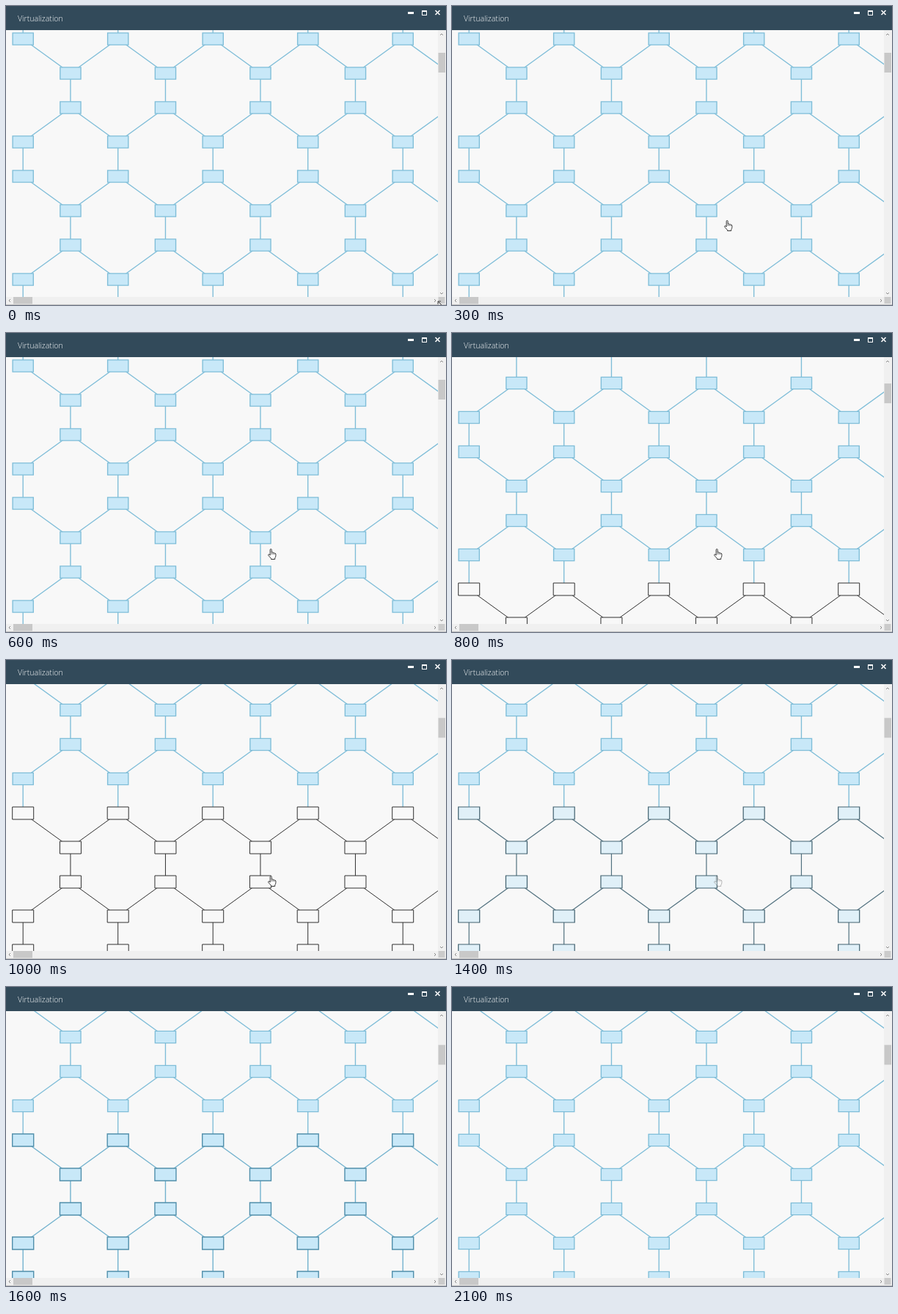
Write an HTML page with a canvas that moves like this. It is 600x409 px and loops after 2200 ms.

```html
<!DOCTYPE html>
<html lang="en">
<head>
<meta charset="utf-8">
<title>Virtualization</title>
<style>
  html, body { margin: 0; width: 100%; height: 100%; overflow: hidden; background: #f8f8f8; }
  canvas { display: block; }
</style>
</head>
<body>
<canvas id="stage" width="600" height="409"></canvas>
<script>
const ctx = document.getElementById('stage').getContext('2d');
const LOOP = 2200, STEP = 100;
const VIEW = { x: 0, y: 33, w: 589, h: 365 };
const COLUMN = 64.75, ROW = 47, SCROLL = 70.5;
const FIRST_NEW_ROW = 8;
const BLUE = [126, 189, 216], PALE = [200, 232, 248], INK = [48, 48, 48], PAPER = [248, 248, 248];
const HAND = new Path2D('M3.2 9V1.5Q3.2.5 4.2.5T5.2 1.5V5Q7 4.6 7.3 5.6Q8.8 5.2 9.2 6.3Q10.9 6 10.9 7.6V9.5Q10.9 11.5 9.7 12.8V14.5H4.5V13.3L1 9.5Q.2 8.4 1 7.8Q1.8 7.4 3.2 9Z');
// Pointer positions at the ends of successive steps, overshooting before it settles.
const APPROACH = [[584, 393], [520, 362], [438, 324], [371, 293], [345, 288], [351, 294], [357, 295]];

const rgb = c => `rgb(${c.map(Math.round).join()})`;
const mix = (a, b, k) => a.map((v, i) => v + (b[i] - v) * k);
const clamp = v => Math.max(0, Math.min(1, v));

function rect(color, x, y, w, h) {
  ctx.fillStyle = color;
  ctx.fillRect(x, y, w, h);
}

function polyline(color, width, ...points) {
  ctx.strokeStyle = color;
  ctx.lineWidth = width;
  ctx.beginPath();
  points.forEach(p => ctx.lineTo(...p));
  ctx.stroke();
}

const isOuter = row => ((row + 4) % 4) % 3 === 0;

// Rows below the first screen start as wireframes and then receive their style.
function rowStyle(row, t) {
  if (row < FIRST_NEW_ROW || t >= 2100) {
    return { link: BLUE, border: BLUE, fill: PALE, width: 1.35, grow: 0 };
  }
  const k = clamp((t - 1200) / 400);
  return {
    link: mix(INK, [114, 178, 206], k),
    border: mix(INK, [80, 143, 171], k),
    fill: mix(PAPER, PALE, k),
    width: 1 + 0.4 * k,
    grow: 0.8
  };
}

function drawGraph(t, scroll) {
  ctx.save();
  ctx.beginPath();
  ctx.rect(VIEW.x, VIEW.y, VIEW.w, VIEW.h);
  ctx.clip();
  const rowY = row => 45 + ROW * row - SCROLL * scroll;
  const colX = col => 23.2 + COLUMN * col;
  const eachNode = draw => {
    for (let row = -1; row < 14; row++) {
      for (let col = isOuter(row) ? 0 : 1; col < 11; col += 2) {
        draw(row, colX(col), rowY(row), rowStyle(row, t), col);
      }
    }
  };
  eachNode((row, x, y, s, col) => {
    const below = rowY(row + 1);
    const color = rgb(s.link);
    const width = s.width;
    if (isOuter(row) === isOuter(row + 1)) {
      polyline(color, width, [x, y], [x, below]);
    } else {
      polyline(color, width, [x, y], [x + COLUMN, below]);
      if (col > 0) polyline(color, width, [x, y], [x - COLUMN, below]);
    }
  });
  eachNode((row, x, y, s) => {
    const w = 28.2 + s.grow, h = 16.2 + s.grow;
    ctx.fillStyle = rgb(s.fill);
    ctx.strokeStyle = rgb(s.border);
    ctx.lineWidth = s.width;
    ctx.beginPath();
    ctx.rect(x - w / 2, y - h / 2, w, h);
    ctx.fill();
    ctx.stroke();
  });
  ctx.restore();
}

function drawWindow(scroll) {
  rect('#324a5a', 0, 0, 600, 33);
  ctx.fillStyle = '#f4f6f7';
  ctx.font = '300 10.6px "Open Sans", "Noto Sans", sans-serif';
  ctx.fillText('Virtualization', 16, 20.5);
  rect('#fff', 548, 8, 8, 3);
  ctx.strokeStyle = '#fff';
  ctx.lineWidth = 1;
  ctx.strokeRect(567.5, 6.5, 6, 6);
  rect('#fff', 567, 6, 7, 2);
  polyline('#fff', 1.6, [585.5, 6], [591.5, 12]);
  polyline('#fff', 1.6, [591.5, 6], [585.5, 12]);

  rect('#f0f0f0', 589, 33, 11, 376);
  rect('#f0f0f0', 0, 398, 600, 11);
  rect('#c8c8c8', 589.5, 64 + 5.1 * scroll, 9.5, 27);
  rect('#c8c8c8', 10, 398, 26, 9.5);
  rect('#cbcbcb', 589.5, 398, 9, 9);
  rect('#c4c4c4', 0, 408, 600, 1);
  const arrow = (...points) => polyline('#8c8c8c', 1, ...points);
  arrow([592, 40], [594, 38], [596, 40]);
  arrow([592, 392], [594, 394], [596, 392]);
  arrow([6, 401], [4, 403], [6, 405]);
  arrow([584, 401], [586, 403], [584, 405]);
}

function drawPointer(t) {
  if (t < 100) {
    polyline('#444', 1, [589, 408], [589, 404], [593, 404]);
    polyline('#444', 1, [589, 404], [595, 410]);
    return;
  }
  const [x, y] = APPROACH[Math.min(6, t / STEP)];
  ctx.save();
  ctx.globalAlpha = clamp((1500 - t) / 300);
  ctx.translate(x, y);
  ctx.fillStyle = '#fff';
  ctx.strokeStyle = '#333';
  ctx.lineWidth = 1;
  ctx.fill(HAND);
  ctx.stroke(HAND);
  polyline('#333', 0.7, [5.3, 5], [5.3, 8]);
  polyline('#333', 0.7, [7.3, 5.8], [7.3, 8]);
  polyline('#333', 0.7, [9.2, 6.5], [9.2, 8.2]);
  ctx.restore();
}

function render(now) {
  const t = Math.floor((now % LOOP) / STEP) * STEP;
  const scroll = Math.max(0, Math.min(3, t / STEP - 7));
  rect('#f8f8f8', 0, 0, 600, 409);
  drawGraph(t, scroll);
  drawWindow(scroll);
  drawPointer(t);
}

const start = performance.now();
function tick() {
  render(performance.now() - start);
  requestAnimationFrame(tick);
}
tick();
</script>
</body>
</html>
```
